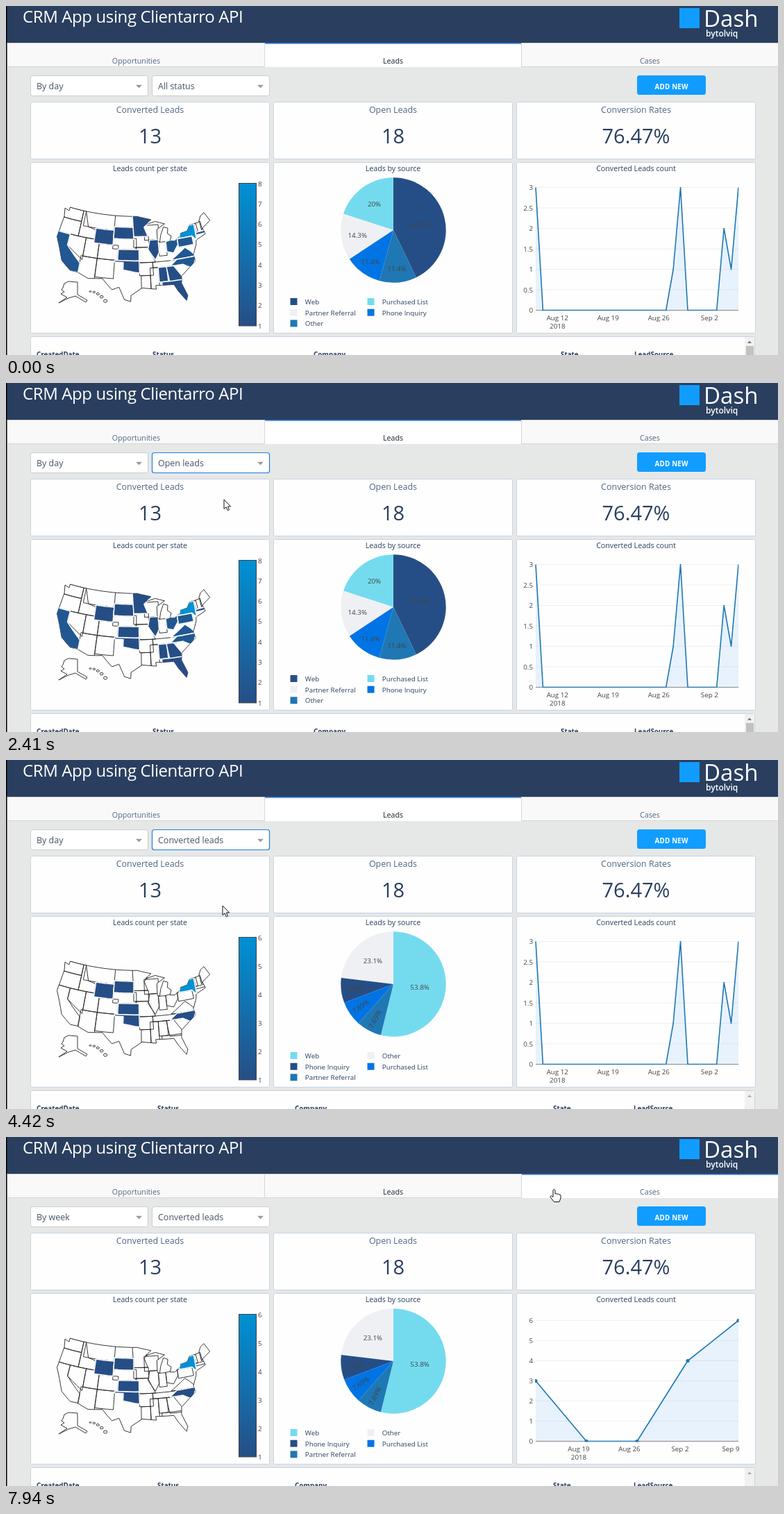
An HTML page for the animation above (8000 ms loop, 1112 by 503 pixels).

```html
<!DOCTYPE html>
<html lang="en">
<head>
<meta charset="utf-8">
<title>CRM dashboard</title>
<style>
  html, body { margin: 0; width: 100%; height: 100%; overflow: hidden; background: #e6e8e7; }
  svg { display: block; font-family: "Open Sans", "Noto Sans", sans-serif; }
</style>
</head>
<body>
<svg id="stage" width="1112" height="503" viewBox="0 0 1112 503">
  <defs>
    <linearGradient id="scale" x1="0" y1="0" x2="0" y2="1">
      <stop offset="0" stop-color="#0091d5"/><stop offset="1" stop-color="#264e86"/>
    </linearGradient>
    <clipPath id="plot"><rect x="762" y="250" width="293.5" height="189.5"/></clipPath>
  </defs>
</svg>
<script>
const LOOP = 8000;
const NAVY = '#2a3f5f', SLATE = '#506784', INK = '#444';
const DEEP = '#264e86', BLUE = '#0074e4', CYAN = '#74dbef', PALE = '#eff0f4', STEEL = '#1f77b4';
const TICK = 9.79, TITLE = 10.68, BODY = 12.46;
const stage = document.getElementById('stage');

// ---- drawing helpers ----
const rect = (x, y, w, h, fill, more = '') =>
  `<rect x="${x}" y="${y}" width="${w}" height="${h}" fill="${fill}" ${more}/>`;
const text = (x, y, s, size, fill, more = '') =>
  `<text x="${x}" y="${y}" font-size="${size}" fill="${fill}" ${more}>${s}</text>`;
const MID = 'text-anchor="middle"', END = 'text-anchor="end"';
const line = (x1, y1, x2, y2, color) =>
  `<path d="M${x1} ${y1}L${x2} ${y2}" stroke="${color}" fill="none"/>`;
const card = (x, y, w, h) => rect(x + .5, y + .5, w, h, '#fefefe', 'stroke="#c8d4e3" rx="2"');

const layers = {};
function layer(name) {
  const g = document.createElementNS('http://www.w3.org/2000/svg', 'g');
  stage.append(g);
  layers[name] = { g, key: null };
}
function paint(name, key, draw) {
  const l = layers[name];
  if (l.key === key) return;
  l.key = key;
  l.g.innerHTML = draw();
}
['base', 'tabs', 'map', 'pie', 'trend', 'table', 'day', 'status', 'cursor', 'edge'].forEach(layer);

// ---- fixed parts ----
function drawBase() {
  const kpis = [['Converted Leads', '13'], ['Open Leads', '18'], ['Conversion Rates', '76.47%']];
  const titles = ['Leads count per state', 'Leads by source', 'Converted Leads count'];
  let s = rect(0, 0, 1112, 503, '#e6e8e7') + rect(0, 0, 1112, 53, NAVY) +
    text(24, 24, 'CRM App using Clientarro API', 24, '#fff', 'letter-spacing="-.4"') +
    rect(970, 3, 29, 29, '#119dff') +
    text(1005, 29.5, 'Dash', 33, '#fff') +
    text(1008, 44, 'bytolviq', 12, '#fff', 'font-weight="600"') +
    rect(909, 100, 99, 28, '#119dff', 'rx="3.5"') +
    text(958.6, 120.3, 'ADD NEW', TICK, '#fff', MID + ' font-weight="700" letter-spacing=".2"');
  kpis.forEach(([name, value], i) => {
    const x = 35 + 350 * i, c = x + 172.5;
    s += card(x, 138, 344, 82) + text(c, 154, name, BODY, SLATE, MID) +
      text(c, 198.3, value, 29, NAVY, MID) +
      card(x, 225, 344, 246) + text(c, 238, titles[i], TITLE, NAVY, MID);
  });
  return s;
}

function drawTabs(active) {
  const w = 370;
  return ['Opportunities', 'Leads', 'Cases'].map((name, i) => {
    const x = 2.5 + w * i, on = i === active;
    return rect(x, 53, w, 35, on ? '#fff' : '#f9f9f9') +
      (on ? rect(x, 53, w, 1.6, '#2f78d6')
        : line(x, 53.5, x + w, 53.5, '#d6d6d6') + line(x, 87.5, x + w, 87.5, '#d6d6d6')) +
      (i ? line(x, 53, x, 88, '#d6d6d6') : '') +
      text(x + w / 2, 83.3, name, TITLE, i === 1 ? '#1c2430' : SLATE, MID);
  }).join('');
}

// ---- map: "west north" degrees; two points make a box, all cut off at the coast ----
const COAST = '124.7 48.4 122.8 48 122.8 49 95.2 49 93 48.6 89.6 48 92 46.7 88 47.4 84.4 46.5 87.6 45.2 87.8 42 87 41.7 ' +
  '86.4 43.5 85 45.7 83.4 45.2 83.8 43.8 82.5 43 83.2 41.7 81.5 41.5 79 42.8 79 43.3 76.3 43.6 75 45 71.3 45.2 70 46.7 ' +
  '68.3 47.3 67 44.8 70.5 43.4 70 41.7 73.8 40.7 74.2 39.5 75.9 37 75.6 35.3 78 33.9 81 32 81.4 30 80.1 26.5 80.7 25.2 ' +
  '82.7 28 83.8 30 89.5 30.2 89.4 29.2 93.8 29.7 97.2 27.7 97.3 26 99.2 26.5 101 29.8 103.2 29 106.5 31.8 111 31.3 ' +
  '114.8 32.5 117.1 32.5 120.6 34.6 122.5 37.8 124.4 40.4 124 46.2';
const STATES = {
  WA: '125 49 117 46', OR: '125 46 117 42', ID: '117 49 116 49 114 45 111 44.5 111 42 117 42',
  NV: '120 42 114 42 114 36 120 39', UT: '114 42 109 37', CO: '109 41 102 37', AZ: '114.6 37 109 31',
  NM: '109 37 103 32', MT: '116 50 104 45', NE: '104 43 95.5 40', IA: '96.5 43.5 91 40.6',
  MO: '95.8 40.6 91.4 40.6 89 36.5 94.6 36.5', AR: '94.5 36.5 90 33', LA: '94 33 91 28', MS: '91 35 88.3 29',
  TN: '90 36.5 82 35', IN: '87.5 41.7 84.8 38', WI: '92.5 46.5 87 42.5', VT: '73.3 45 72.5 42.7', ME: '71 45.3 70.7 43',
  CA: '125 42 120 42 120 39 114.5 35 114.5 32.4 125 32.4',
  WY: '111 45 104 41', SD: '104 46 96.5 42.8', KS: '102 40 94.6 37',
  MN: '97.2 50 89 48 92.5 46 91.2 43.5 96.5 43.5',
  OK: '103 37 94.6 37 94.5 33.7 100 34.5 100 36.5 103 36.5',
  IL: '90.6 42.5 87.5 42.5 87.5 39 89 37 91.4 40', OH: '84.8 41.7 80.5 42.2 80.5 40.5 82.5 38.4 84.8 39',
  PA: '80.5 42 75 39.7', NY: '79.8 42 79 43.5 75 45 73.3 45 73.6 40.6 75 42', MA: '73.4 42.7 69 42',
  VA: '83.7 36.6 78.3 39.4 77 38.5 75 36.6', NC: '84.3 35 81.7 36.6 75 36.6 77 33.5 80 35',
  GA: '85.6 35 83.1 35 80.9 32 81 30.6 85 30.7', AL: '88.3 35 85.4 31', FL: '87.5 31 79 24'
};
const ALASKA = 'M82 406L84 400L90 397L103 398V416L117 424L115 427L100 418L90 421L76 428L88 420L79 415L84 412L80 409Z';

const RAD = Math.PI / 180;
const SIN1 = Math.sin(29.5 * RAD), CONE = (SIN1 + Math.sin(45.5 * RAD)) / 2;
const SPAN = 1 - SIN1 * SIN1 + 2 * CONE * SIN1;
function project(west, north) {
  const r = 305 * Math.sqrt(SPAN - 2 * CONE * Math.sin(north * RAD)) / CONE;
  const a = CONE * (96 - west) * RAD;
  return (185.9 + r * Math.sin(a)).toFixed(1) + ' ' + (r * Math.cos(a) - 32.8).toFixed(1);
}
function shape(list) {
  const n = list.split(' ').map(Number);
  let pts = [];
  for (let i = 0; i < n.length; i += 2) pts.push([n[i], n[i + 1]]);
  if (pts.length === 2) {
    const [[w, top], [e, low]] = pts;
    pts = [[w, top], [e, top], [e, low], [w, low]];
  }
  const path = pts.flatMap((a, i) => {
    const b = pts[(i + 1) % pts.length], parts = Math.ceil(Math.abs(b[0] - a[0]) / 2) || 1;
    return Array.from({ length: parts }, (_, k) =>
      project(a[0] + (b[0] - a[0]) * k / parts, a[1] + (b[1] - a[1]) * k / parts));
  });
  return 'M' + path.join('L') + 'Z';
}

const LEVELS = {
  all: 'NY8 CA2 VA2 NC2 OH2 PA2 MA1 WY1 SD1 MN1 KS1 OK1 IL1 AL1 GA1 FL1',
  open: 'NY2 CA2 VA2 MN1 IL1 OH1 PA1 NC1 GA1 FL1',
  won: 'NY6 WY1 SD1 KS1 OK1 NC1'
};
function shade(f) {
  const mix = (a, b) => Math.round(a + (b - a) * f);
  return `rgb(${mix(38, 0)},${mix(78, 145)},${mix(134, 213)})`;
}

function drawMap(mode) {
  const small = mode === 'open', bar = small ? 328.5 : 335.5, k = small ? 298 / 305 : 1;
  const items = LEVELS[mode].split(' '), top = +items[0][2], step = small ? .2 : 1;
  const coast = shape(COAST);
  const lines = Object.values(STATES).map(shape).join('');
  const fills = items.map(item =>
    `<path d="${shape(STATES[item.slice(0, 2)])}" fill="${shade((item[2] - 1) / (top - 1))}"/>`).join('');
  let islands = '';
  for (let i = 0; i < 5; i++) {
    islands += `<ellipse cx="${121.5 + 5.4 * i}" cy="${411.5 + .85 * i * i}" rx="${1.4 + .3 * i}" ry="${.9 + .3 * i}"/>`;
  }
  let s = `<clipPath id="land"><path d="${coast}"/></clipPath>` +
    `<g transform="matrix(${k} 0 0 ${k} ${small ? 181.8 - 185.9 * k : 0} ${358.4 * (1 - k)})" fill="none" stroke-linejoin="round">` +
    `<g stroke="#222" stroke-width=".9"><path d="${lines}" clip-path="url(#land)"/><path d="${coast + ALASKA}"/>${islands}</g>` +
    `<g stroke="#fff" stroke-width="1.5" clip-path="url(#land)">${fills}</g></g>` +
    rect(bar, 255.5, 25, 205.5, 'url(#scale)', 'stroke="#444"');
  const count = Math.round((top - 1) / step);
  for (let i = 0; i <= count; i++) {
    s += text(bar + 27.5, 259.5 + 205 * i / count, +(top - i * step).toFixed(1), TICK, INK);
  }
  return s;
}

// ---- pie: sources in legend order with lead counts ----
const COLORS = [DEEP, CYAN, PALE, BLUE, STEEL], WON_COLORS = [CYAN, PALE, DEEP, BLUE, STEEL];
const SOURCES = {
  all: { Web: 15, 'Purchased List': 7, 'Partner Referral': 5, 'Phone Inquiry': 4, Other: 4 },
  open: { Web: 7, 'Purchased List': 5, 'Partner Referral': 3, 'Phone Inquiry': 2, Other: 1 },
  won: { Web: 7, Other: 3, 'Phone Inquiry': 1, 'Purchased List': 1, 'Partner Referral': 1 }
};

function drawPie(mode) {
  const cx = 558, cy = 323, r = 75.7;
  const leads = Object.entries(SOURCES[mode]), colors = mode === 'won' ? WON_COLORS : COLORS;
  const total = leads.reduce((sum, [, n]) => sum + n, 0);
  const at = (f, d) => [cx + d * Math.sin(2 * Math.PI * f), cy - d * Math.cos(2 * Math.PI * f)];
  let end = 1 + leads[0][1] / total, slices = '', labels = '', keys = '';
  leads.forEach(([name, n], i) => {
    const share = n / total, start = end - share, mid = start + share / 2;
    slices += `<path d="M${cx} ${cy}L${at(start, r)}A${r} ${r} 0 ${share > .5 ? 1 : 0} 1 ${at(end, r)}Z" fill="${colors[i]}"/>`;
    // Narrow slices push their label outwards and turn it along the radius.
    const [x, y] = at(mid, Math.min(57, r / 2 + 19 * Math.exp(8.5 * (.11 - share))));
    const turn = share > .08 ? 0 : mid * 360 - 90 - (mid % 1 > .5 ? 180 : 0);
    labels += text(x, y + 3.5, `${+(share * 100).toPrecision(3)}%`, TICK, INK, `${MID} transform="rotate(${turn} ${x} ${y})"`);
    const kx = 409.5 + 111 * (i % 2), ky = 421 + 15.7 * (i >> 1);
    keys += rect(kx, ky, 10, 10, colors[i]) + text(kx + 21.3, ky + 8.8, name, TICK, NAVY);
    end = start;
  });
  return slices + labels + keys;
}

// ---- trend chart: conversions by day, summed up for weeks ----
const DAILY = { 0: 3, 19: 1, 20: 3, 26: 2, 27: 1, 28: 3 };
function drawTrend(weekly) {
  const x0 = 763, width = 292, y0 = 438.5, gap = weekly ? 29 : 29.5;
  const bin = weekly ? 7 : 1, unit = weekly ? gap : 2 * gap;
  const values = Array(28 / bin + 1).fill(0);
  for (const day in DAILY) values[Math.ceil(day / bin)] += DAILY[day];
  const xy = values.map((v, i) => [x0 + width * i / (values.length - 1), y0 - unit * v]);
  const d = 'M' + xy.map(p => p.join(' ')).join('L');
  let s = `<path d="${d}V${y0}H${x0}Z" fill="#e7f2fd"/>`;
  for (let i = 0; i <= 6; i++) {
    const y = y0 - i * gap;
    s += line(x0, y, x0 + width, y, i ? 'rgba(68,68,68,.08)' : '#888') +
      text(759, y + 3.5, weekly ? i : i / 2, TICK, INK, END);
  }
  s += `<g clip-path="url(#plot)"><path d="${d}" fill="none" stroke="${STEEL}" stroke-width="1.6" stroke-linejoin="round"/>`;
  if (weekly) for (const [x, y] of xy) s += `<circle cx="${x}" cy="${y}" r="2.6" fill="${STEEL}"/>`;
  s += '</g>';
  const first = weekly ? 825 : 794.3, skip = weekly ? 1 : 0;
  ['Aug 12', 'Aug 19', 'Aug 26', 'Sep 2', 'Sep 9'].slice(skip, skip + 4).forEach((name, i) => {
    s += text(first + 73 * i, 453, name, TICK, INK, MID);
  });
  return s + text(first, 465, '2018', TICK, INK, MID);
}

// ---- table top ----
const COLUMNS = { all: [44, 211, 443, 799, 905], open: [44, 214, 435, 796, 904], won: [44, 218, 416, 788, 904] };
function drawTable(mode) {
  const names = ['CreatedDate', 'Status', 'Company', 'State', 'LeadSource'], fits = mode === 'won';
  return card(35, 476, 1043, 40) +
    COLUMNS[mode].map((x, i) => text(x, 505.6, names[i], TICK, NAVY, 'font-weight="700"')).join('') +
    rect(1064, 477, 14, 26, '#f1f1f1') +
    `<path d="M1068 486l3-3.5l3 3.5Z" fill="${fits ? '#a8a8a8' : '#777'}"/>` +
    (fits ? '' : rect(1066, 490, 11, 13, '#c1c1c1'));
}

// ---- dropdowns ----
const STATUS = ['All status', 'Open leads', 'Converted leads', 'Lost leads'];
const PERIOD = ['By day', 'By week', 'By month'];
const ROW = 28.8;
function drawSelect(x, options, picked, open, focus, hover) {
  let s = rect(x + .5, 100.5, 169, 29, '#fff', `rx="3" stroke="${focus ? '#1c7fe0' : '#ccc'}" stroke-width="${focus ? 1.2 : 1}"`) +
    text(x + 9, 120, options[picked], BODY, '#465264') +
    `<path d="M${x + 152} ${open ? 118.3 : 113.7}h9l-4.5 ${open ? -4.6 : 4.6}Z" fill="#999"/>`;
  if (!open) return s;
  const h = ROW * options.length + 1;
  s += rect(x, 131, 170, h + 1, 'rgba(0,0,0,.08)') +
    rect(x + .5, 129.5, 169, h, '#fff', 'stroke="#ccc"') +
    rect(x + 1, 130 + ROW * hover, 168, ROW, '#e5f2fd') +
    line(x + 9.5, 108, x + 9.5, 124, '#222');
  options.forEach((name, i) => {
    const on = i === picked;
    s += text(x + 5, 149 + ROW * i, name, BODY, on ? '#465a75' : '#62748c', on ? 'font-weight="600"' : '');
  });
  return s;
}

// ---- pointer: start, end, goal; each move begins at the last goal ----
const BEAT = 77;
const MOVES = [
  [0, 0, 966, 478], [310, 1010, 343, 112], [1620, 2170, 314, 168], [2550, 3020, 322, 113],
  [3200, 3500, 312, 210], [4420, 5220, 164, 115], [5290, 5450, 161, 154], [5450, 5670, 160, 169],
  [6450, 7070, 763, 83], [7240, 7410, 788, 75]
];
function pointer(t) {
  const i = Math.max(1, MOVES.findLastIndex(m => t >= m[0]));
  const [start, end, x, y] = MOVES[i], [, , px, py] = MOVES[i - 1];
  const steps = Math.round((end - start) / BEAT);
  const k = Math.min(steps, Math.max(0, Math.floor((t - start) / (end - start) * steps + 1e-6)));
  const f = k / steps, e = f * f * (3 - 2 * f);
  return [px + (x - px) * e, py + (y - py) * e];
}
const ARROW = 'M0 0V13.5L3.1 10.7L5.4 15.8L7.6 14.8L5.4 10H9.6Z';
const HAND = 'M0 1.5Q1.5 -1 3 1.5V7Q5 5.8 6 7.4Q8 6.4 8.8 8Q10.6 7.4 11 9.5V13L9 18.5H1.5L-4 11.5Q-4 8.8 -1.5 10.3L0 11.5Z';

// ---- playback ----
function show(t) {
  const [px, py] = pointer(t);
  const within = (a, b) => t >= a && t < b;
  const mode = t < 2550 ? 'all' : t < 4020 ? 'open' : 'won';
  const rows = t < 2550 ? 'all' : t < 3870 ? 'open' : 'won';
  const tab = t < 7860 ? 1 : 2, weekly = t >= 5990, hand = t >= 7240;
  const select = (name, x, options, picked, open, focus) => {
    const over = Math.floor((py - 130) / ROW);
    const hover = over >= 0 && over < options.length ? over : picked;
    paint(name, [picked, open, focus, open && hover].join(), () => drawSelect(x, options, picked, open, focus, hover));
  };
  paint('tabs', tab, () => drawTabs(tab));
  paint('map', mode, () => drawMap(mode));
  paint('pie', mode, () => drawPie(mode));
  paint('trend', weekly, () => drawTrend(weekly));
  paint('table', rows, () => drawTable(rows));
  select('day', 35, PERIOD, t < 5910 ? 0 : 1, within(5220, 5910), within(5910, 7860));
  select('status', 210, STATUS, t < 2410 ? 0 : t < 3870 ? 1 : 2,
    within(1310, 2410) || within(3200, 3870), within(2410, 3200) || within(3870, 5220));
  paint('cursor', t < 310 ? 'none' : [px, py, hand].join(), () => t < 310 ? '' :
    `<path transform="translate(${px} ${py})" d="${hand ? HAND : ARROW}" fill="#fff" stroke="#111" stroke-linejoin="round"/>`);
}

paint('base', 1, drawBase);
paint('edge', 1, () => rect(0, 0, 1.5, 503, '#000'));
const begin = performance.now();
function tick() {
  show((performance.now() - begin) % LOOP);
  requestAnimationFrame(tick);
}
tick();
</script>
</body>
</html>
```
